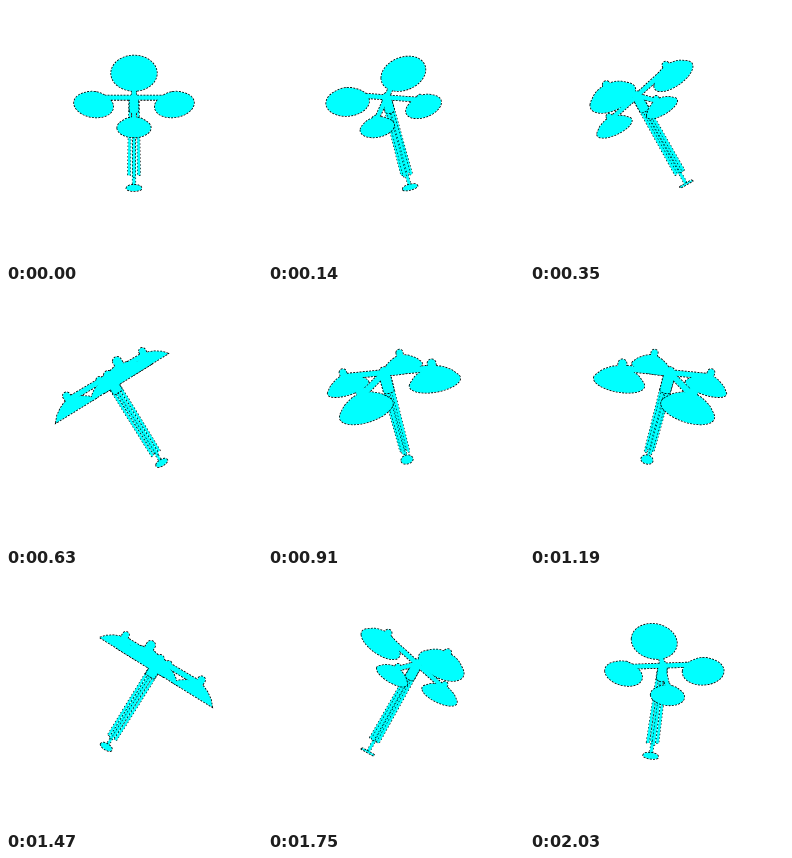
Recreate the animation shown at these times as an HTML page with a canvas. Size 256 by 256 pixels, loop 2100 ms.

```html
<!DOCTYPE html>
<html>
<head>
<meta charset="utf-8">
<style>
html, body { margin: 0; width: 100%; height: 100%; overflow: hidden; background: #fff; }
canvas { display: block; }
</style>
</head>
<body>
<canvas id="stage" width="256" height="256"></canvas>
<script>
const ctx = document.getElementById('stage').getContext('2d');
const STEP = 70, STEPS = 30;
const MID = 128, CAMERA = 220;
const TILT = 33 * Math.PI / 180;
const HUB = 0.5, REACH = 43.7, ARM = 48, RIM = 36.4;
const SIDES = [[1, 0], [0, 1], [-1, 0], [0, -1]];
let spin = 0;

// Tilt the lamp, turn it about the vertical, then apply perspective.
function project(x, y, z) {
  const h = z * Math.cos(TILT) - y * Math.sin(TILT);
  const v = y * Math.cos(TILT) + z * Math.sin(TILT);
  const px = x * Math.cos(spin) + h * Math.sin(spin);
  const depth = h * Math.cos(spin) - x * Math.sin(spin);
  const s = CAMERA / (CAMERA - depth);
  return [MID + px * s, MID - v * s, s];
}

function around(n, point) {
  return Array.from({ length: n }, (_, i) => {
    const a = i * 2 * Math.PI / n;
    return point(Math.cos(a), Math.sin(a));
  });
}

const ring = (x, y, z, r, n = 40) =>
  around(n, (c, s) => project(x + r * c, y, z + r * s));

function ball(x, y, z, r) {
  const [px, py, k] = project(x, y, z);
  return around(20, (c, s) => [px + r * k * c, py + r * k * s]);
}

function hull(points) {
  points.sort((a, b) => a[0] - b[0] || a[1] - b[1]);
  const half = list => {
    const out = [];
    for (const p of list) {
      while (out.length > 1) {
        const [a, b] = out.slice(-2);
        if ((b[0] - a[0]) * (p[1] - a[1]) > (b[1] - a[1]) * (p[0] - a[0])) break;
        out.pop();
      }
      out.push(p);
    }
    return out.slice(0, -1);
  };
  const lower = half(points);
  return lower.concat(half(points.reverse()));
}

function solid(...groups) {
  const path = new Path2D();
  for (const [x, y] of hull(groups.flat())) path.lineTo(x, y);
  path.closePath();
  return path;
}

const tube = (x, z, r, low, high) => solid(ring(x, low, z, r, 16), ring(x, high, z, r, 16));

const buildRods = () => [
  tube(0, 0, 1.3, -55, 40),
  ...SIDES.map(([dx, dz]) => tube(dx * 4.4, dz * 4.4, 1.2, -43.5, 44))
];

function buildHead() {
  const parts = [
    tube(0, 0, 4.8, 30, 47),
    solid(ball(0, ARM + 1, HUB, 4)),
    solid(ring(0, -56, 0, 6.6), ring(0, -55, 0, 6.2))
  ];
  for (const [dx, dz] of SIDES) {
    const x = dx * REACH, z = HUB + dz * REACH;
    parts.push(
      solid(ball(0, ARM, HUB, 2.4), ball(x, ARM, z, 2.4)),
      solid(ring(x, RIM, z, 21), ring(x, RIM + 5, z, 16.5), ring(x, RIM + 9, z, 10.5), ring(x, RIM + 11.5, z, 5)),
      solid(ball(x, ARM, z, 3.3), ball(x, ARM + 4, z, 3.3))
    );
  }
  return parts;
}

const outline = part => ctx.stroke(part);
const fill = part => ctx.fill(part);

function draw(now) {
  spin = Math.floor(now / STEP) % STEPS * 2 * Math.PI / STEPS;
  ctx.fillStyle = '#fff';
  ctx.fillRect(0, 0, 256, 256);
  ctx.fillStyle = '#0ff';
  ctx.strokeStyle = '#000';
  ctx.lineWidth = 1.2;
  ctx.setLineDash([1.5, 2]);
  buildRods().forEach(rod => { outline(rod); fill(rod); });
  // Outlines go first so that only the outer contour of the head stays visible.
  const head = buildHead();
  ctx.lineWidth = 1.6;
  ctx.setLineDash([2, 1.2]);
  head.forEach(outline);
  head.forEach(fill);
}

const start = performance.now();
function tick() {
  draw(performance.now() - start);
  requestAnimationFrame(tick);
}
tick();
</script>
</body>
</html>
```
